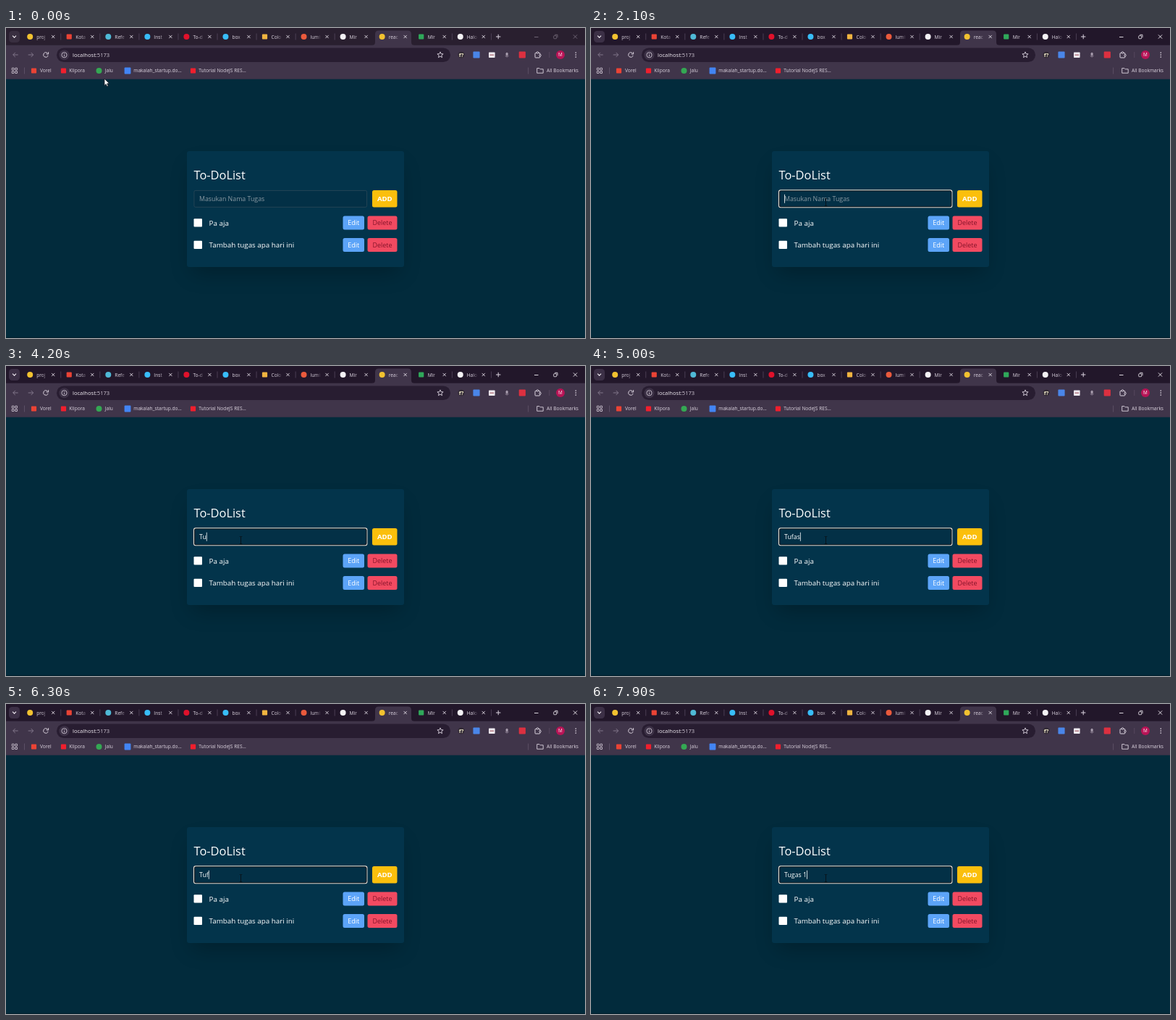
An HTML page with a canvas for the animation above (8000 ms loop, 800x428 px).

```html
<!DOCTYPE html>
<html lang="id">
<head>
<meta charset="utf-8">
<title>To-DoList</title>
<style>
  html, body { margin: 0; width: 100%; height: 100%; overflow: hidden; background: #022b3c; }
  canvas { display: block; width: 800px; height: 428px; }
</style>
</head>
<body>
<canvas id="stage"></canvas>
<script>
const W = 800, H = 428, LOOP = 8000, STEP = 100, FOCUS = 2000;
const SANS = '"Open Sans", "Noto Sans", sans-serif';
const BAR = '#40354a', INK = '#dcd4e0';
const canvas = document.getElementById('stage');
const g = canvas.getContext('2d');
const dpr = window.devicePixelRatio || 1;
canvas.width = W * dpr;
canvas.height = H * dpr;

// Each entry: time of the key press and the field value after it.
const keys = [
  [FOCUS, ''], [4000, 'T'], [4200, 'Tu'], [4400, 'Tuf'], [4600, 'Tufa'], [4800, 'Tufas'],
  [6000, 'Tufa'], [6200, 'Tuf'], [6500, 'Tu'], [6700, 'Tug'], [6900, 'Tuga'], [7100, 'Tugas'],
  [7400, 'Tugas '], [7700, 'Tugas 1']
];

const tabs = [
  ['proj', '#f2c230'], ['Kota', '#ea4335', 1], ['Refe', '#4fb9d6'], ['Inst', '#38bdf8'],
  ['To-d', '#e0112b'], ['box', '#38bdf8'], ['Colo', '#f0b440', 1], ['lumi', '#ea5a3c'],
  ['Mir', '#f4f2f5'], ['reac', '#f2c230'], ['Mir', '#2fa85a', 1], ['Halo', '#f4f2f5']
];
const ACTIVE = 9;

function rect(x, y, w, h, r, fill, stroke, lw = 1) {
  g.beginPath();
  g.roundRect(x, y, w, h, r);
  if (fill) { g.fillStyle = fill; g.fill(); }
  if (stroke) { g.strokeStyle = stroke; g.lineWidth = lw; g.stroke(); }
}

function disc(x, y, r, fill, stroke, lw = 1) {
  g.beginPath();
  g.arc(x, y, r, 0, Math.PI * 2);
  if (fill) { g.fillStyle = fill; g.fill(); }
  if (stroke) { g.strokeStyle = stroke; g.lineWidth = lw; g.stroke(); }
}

function path(points, color, lw = 1, closed = false, fill = null) {
  g.beginPath();
  for (let i = 0; i < points.length; i += 2) g.lineTo(points[i], points[i + 1]);
  if (closed) g.closePath();
  if (fill) { g.fillStyle = fill; g.fill(); }
  g.strokeStyle = color;
  g.lineWidth = lw;
  g.stroke();
}

function text(s, x, y, size, color, weight = 500, align = 'left') {
  g.font = `${weight} ${size}px ${SANS}`;
  g.textAlign = align;
  g.fillStyle = color;
  g.fillText(s, x, y);
}

function mark(x, y, color, square, r = 4) {
  if (square) rect(x - r + 0.4, y - r + 0.4, 2 * r - 0.8, 2 * r - 0.8, 1, color);
  else disc(x, y, r, color);
}

function cross(x, y, r, color, lw) {
  path([x - r, y - r, x + r, y + r], color, lw);
  path([x + r, y - r, x - r, y + r], color, lw);
}

function tabStrip(focused) {
  rect(0, 0, W, 23.6, 0, focused ? '#22172a' : '#291f2f');
  rect(4, 4, 15, 16, 4.5, focused ? '#3c3046' : '#392f40');
  path([9, 10.7, 11.5, 13.2, 14, 10.7], '#f0ebf2', 1.1);

  // Active tab flares out into the toolbar.
  g.beginPath();
  g.moveTo(505.5, 24);
  g.quadraticCurveTo(510, 24, 510, 19.5);
  g.lineTo(510, 8.5);
  g.quadraticCurveTo(510, 3.5, 515, 3.5);
  g.lineTo(555, 3.5);
  g.quadraticCurveTo(560, 3.5, 560, 8.5);
  g.lineTo(560, 19.5);
  g.quadraticCurveTo(560, 24, 564.5, 24);
  g.fillStyle = BAR;
  g.fill();

  tabs.forEach(([name, color, square], i) => {
    const x = 33.2 + i * 54.05;
    mark(x, 12, color, square);
    const fade = g.createLinearGradient(x + 9, 0, x + 23.5, 0);
    fade.addColorStop(0, INK);
    fade.addColorStop(0.55, INK);
    fade.addColorStop(1, 'rgba(220,212,224,0.1)');
    g.save();
    g.beginPath();
    g.rect(x + 8.5, 2, 15, 20);
    g.clip();
    text(name, x + 9, 14.6, 6.6, fade);
    g.restore();
    cross(x + 32, 12, 2.1, '#e4dde7', 0.9);
    if (i !== ACTIVE && i !== ACTIVE - 1) rect(x + 42.2, 7.5, 0.8, 9, 0, '#55485e');
  });
  path([677, 12, 683.4, 12], INK, 1);
  path([680.2, 8.8, 680.2, 15.2], INK, 1);

  const ctl = focused ? '#f2eef4' : '#766c7c';
  path([730, 12.5, 735.5, 12.5], ctl, 0.9);
  rect(756.7, 10.7, 4, 4, 0.8, null, ctl, 0.8);
  path([758.2, 9.3, 762, 9.3, 762, 13.2], ctl, 0.8);
  cross(786.5, 12, 2.6, ctl, 0.9);
}

function arrow(x, dir, color) {
  path([x - 3.5 * dir, 37, x + 3.5 * dir, 37], color, 1);
  path([x + 0.4 * dir, 33.9, x + 3.5 * dir, 37, x + 0.4 * dir, 40.1], color, 1);
}

function star(cx, cy) {
  const pts = [];
  for (let i = 0; i < 10; i++) {
    const a = -Math.PI / 2 + i * Math.PI / 5, r = i % 2 ? 1.9 : 4.3;
    pts.push(cx + r * Math.cos(a), cy + r * Math.sin(a));
  }
  path(pts, INK, 0.9, true);
}

function toolbar() {
  rect(0, 23.6, W, 47, 0, BAR);
  arrow(13.2, -1, '#81768a');
  arrow(34.2, 1, '#81768a');
  g.beginPath();
  g.arc(55, 37, 3.2, 0.3, Math.PI * 1.8);
  g.strokeStyle = INK;
  g.lineWidth = 1;
  g.stroke();
  path([58.6, 33.2, 58.6, 36, 55.8, 36], INK, 1);

  rect(70, 27.5, 544, 19.5, 9.75, '#281d31');
  disc(80.5, 37.2, 7, '#3c3146');
  disc(80.5, 37.2, 3.6, null, INK, 0.8);
  path([80.5, 36.8, 80.5, 39.2], INK, 0.8);
  path([80.5, 35, 80.5, 35.8], INK, 0.8);
  text('localhost', 92, 39.9, 7.6, '#f2edf4');
  text(':5173', 92 + g.measureText('localhost').width, 39.9, 7.6, '#cfc6d3');
  star(600, 37.2);

  disc(629, 37, 4.6, '#322a36');
  text('f?', 629, 39.8, 7.5, '#f0e9c8', 700, 'center');
  mark(650, 37, '#4a86e8', true, 5);
  rect(667, 33.5, 8.6, 7.5, 0.8, '#eeeaf0');
  path([668.5, 37.2, 674, 37.2], '#a9606a', 1.2);
  rect(690.6, 33.8, 3, 4.6, 1.5, '#a69bac');
  path([689.8, 38.6, 692.1, 40, 694.4, 38.6], '#a69bac', 0.8);
  mark(713.3, 37, '#dc3040', true, 5);

  rect(731, 34.4, 6.8, 6.6, 0.8, null, INK, 1);
  disc(734.4, 34, 1.3, BAR, INK, 0.9);
  disc(738, 37.7, 1.3, BAR, INK, 0.9);
  rect(750.4, 33, 0.8, 8, 0, '#5a4e63');
  disc(766, 37, 6, '#b81456');
  text('M', 766, 39.3, 6.4, '#fbe9f1', 500, 'center');
  for (let i = -1; i < 2; i++) disc(787.3, 37 + i * 3, 0.85, INK);
}

function bookmarks() {
  for (let i = 0; i < 4; i++) {
    rect(8.2 + (i % 2) * 4.5, 55.2 + (i >> 1) * 4.5, 2.8, 2.8, 0.3, null, INK, 0.8);
  }
  rect(25, 54.5, 0.8, 9, 0, '#63576c');
  const y = 61.3, size = 6.6;
  mark(38.5, 59, '#ea4335', true);
  text('Vorel', 47, y, size, INK);
  mark(79.5, 59, '#f01f2d', true);
  text('Klipora', 87.3, y, size, INK);
  mark(128.5, 59, '#34a853');
  text('Jalu', 136.7, y, size, INK);
  mark(168, 59, '#4285f4', true, 4.8);
  text('makalah_startup.do...', 176.3, y, size, INK);
  mark(258.5, 59, '#f01f2d', true);
  text('Tutorial NodeJS RES...', 266.3, y, size, INK);
  rect(721.3, 54.5, 0.8, 9, 0, '#63576c');
  path([733.7, 55.6, 737, 55.6, 738.2, 56.8, 742.2, 56.8, 742.2, 62.2, 733.7, 62.2], INK, 0.9, true);
  text('All Bookmarks', 747, y, size, INK);
}

function task(y, label) {
  rect(259.5, y + 3.7, 11.5, 11.2, 1, '#ffffff');
  text(label, 280.6, y + 13.2, 9.8, '#ffffff');
  rect(465.5, y, 29.5, 19, 2.5, '#5ca4f8');
  text('Edit', 480.2, y + 12.8, 9.1, '#ffffff', 500, 'center');
  rect(499.5, y, 41, 19, 2.5, '#f24a61');
  text('Delete', 520, y + 12.8, 9, '#84142a', 500, 'center');
}

function field(t, focused) {
  if (focused) {
    rect(259.5, 223.9, 239.4, 23.8, 2.5, '#033046', '#f0dfd3', 1.1);
    rect(260.6, 225, 237.2, 21.6, 1.8, null, '#0d1a22', 1);
  } else {
    rect(259.9, 224.4, 238.7, 22.9, 2, '#033046', '#294757', 0.9);
  }
  let last = null;
  for (const k of keys) if (k[0] <= t) last = k;
  const value = last ? last[1] : '';
  text(value || 'Masukan Nama Tugas', 267, 239.3, 8.8, value ? '#ffffff' : '#8b9aa3');
  if (last && (t - last[0]) % 1000 < 500) {
    rect(267 + g.measureText(value).width, 229.8, 0.8, 12, 0, '#ffffff');
  }
}

function page(t, focused) {
  rect(0, 70.6, W, H - 70.6, 0, '#022b3c');
  rect(0, 426.8, W, 1.2, 0, '#02202d');
  // Soft shadow, pulled in behind the card.
  g.save();
  g.shadowColor = 'rgba(0,0,0,0.25)';
  g.shadowBlur = 29 * dpr;
  g.shadowOffsetY = 14.6 * dpr;
  rect(257, 177, 286, 146, 3, '#03344b');
  g.restore();
  rect(250, 170, 300, 160, 3, '#03344b');
  text('To-DoList', 259.5, 208.8, 16.4, '#ffffff');
  field(t, focused);
  rect(506, 224, 34.5, 23.5, 2.5, '#fbbf0c');
  text('ADD', 523.3, 239.4, 9.6, '#ffffff', 700, 'center');
  task(259.5, 'Pa aja');
  task(290, 'Tambah tugas apa hari ini');
}

function pointer(t) {
  const mix = (a, b, p) => a + (b - a) * p;
  let x, y;
  if (t < 1100) {
    const p = Math.pow(t / 1100, 1.5);
    x = mix(136, 224, p);
    y = mix(70, 160, p);
  } else {
    const q = 1 - Math.min(1, (t - 1100) / 800);
    const p = 1 - q * q;
    x = mix(224, 324.5, p);
    y = mix(160, 240.5, p);
  }
  const inField = x > 259 && x < 499 && y > 224 && y < 248;
  g.save();
  g.translate(x, y);
  if (inField) {
    path([0, -4.5, 0, 4.5], '#08131a', 1);
    path([-1.8, -5, 1.8, -5], '#08131a', 0.8);
    path([-1.8, 5, 1.8, 5], '#08131a', 0.8);
  } else {
    path([0, 0, 0, 9.4, 2.1, 7.4, 3.7, 10.8, 5.2, 10.1, 3.7, 6.8, 6.6, 6.6],
      '#10141a', 0.7, true, '#ffffff');
  }
  g.restore();
}

function draw(now) {
  const t = Math.floor((now % LOOP) / STEP) * STEP;
  const focused = t >= FOCUS;
  g.setTransform(dpr, 0, 0, dpr, 0, 0);
  page(t, focused);
  toolbar();
  tabStrip(focused);
  bookmarks();
  pointer(t);
}

const start = performance.now();
function tick() {
  draw(performance.now() - start);
  requestAnimationFrame(tick);
}
tick();
</script>
</body>
</html>
```
